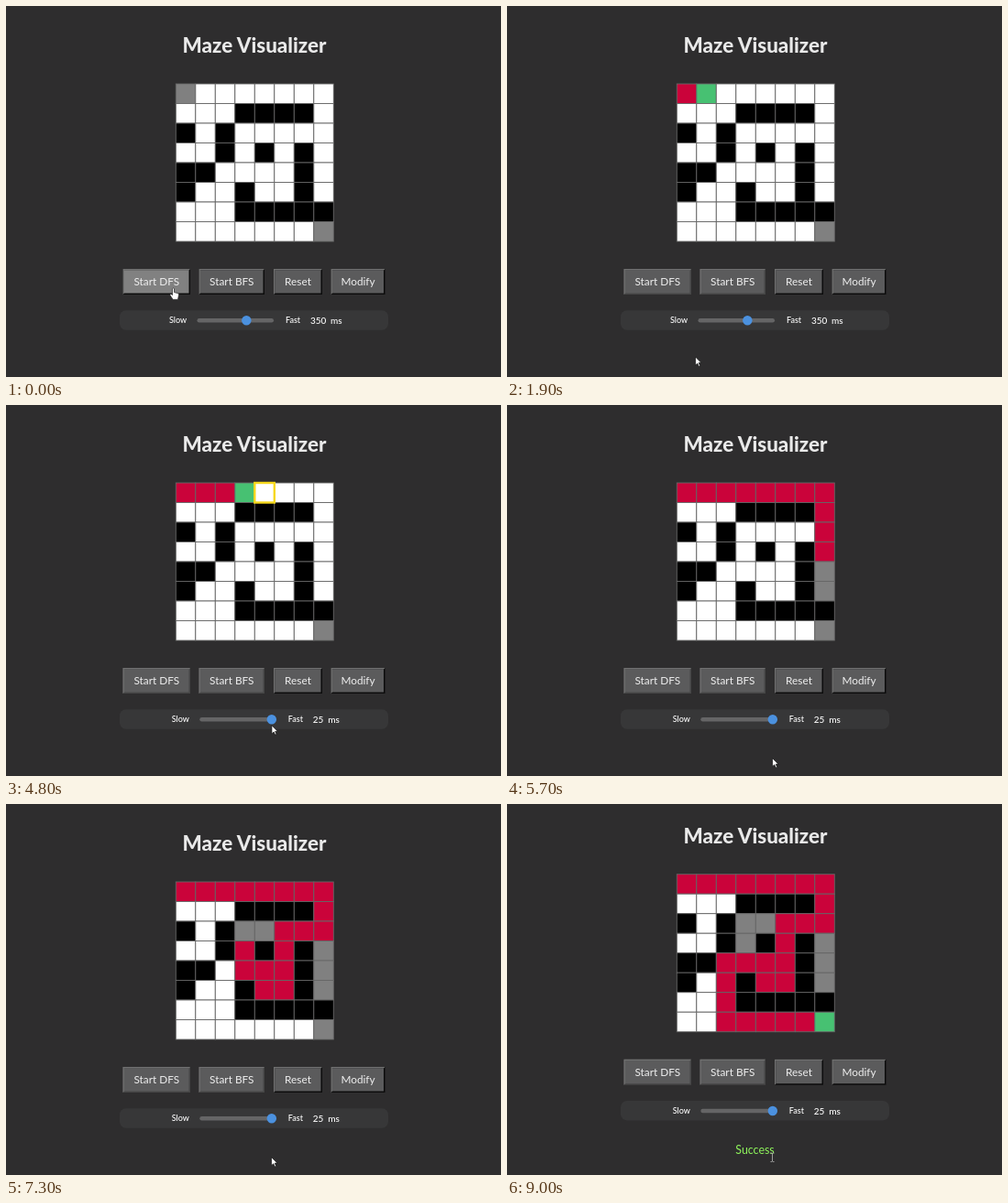
An HTML page for the animation above (9200 ms loop, 540x405 px).

```html
<!DOCTYPE html>
<html lang="en">
<head>
<meta charset="utf-8">
<title>Maze Visualizer</title>
<style>
  html, body { margin: 0; width: 100%; height: 100%; overflow: hidden; background: #2e2d2e; }
  svg { display: block; width: 540px; height: 405px; }
  text { font-family: Lato, "Open Sans", sans-serif; fill: #efefef; }
  .title { font-size: 22.4px; font-weight: 800; fill: #e9e9e9; }
  .button { font-size: 11.8px; }
  .label { font-size: 9px; font-weight: 500; fill: #fff; }
  .value { font-size: 10px; font-weight: 500; fill: #fff; }
  .mid { text-anchor: middle; }
</style>
</head>
<body>
<svg viewBox="0 0 540 405">
  <g id="page">
    <text class="title mid" x="271" y="51">Maze Visualizer</text>
    <g id="maze" stroke="#666" stroke-width=".9"></g>
    <rect id="probe" width="21.5" height="21.5" fill="none" stroke="#f6d81c" stroke-width="2.4"/>
    <g id="buttons"></g>
    <rect x="124" y="332.3" width="293" height="21.4" rx="7" fill="#373738"/>
    <g id="slider">
      <text class="label" x="178" y="346.4">Slow</text>
      <rect x="208.5" y="341" width="83.5" height="4.6" rx="2.3" fill="#656566"/>
      <circle id="thumb" cy="343.3" r="5.2" fill="#4b91df"/>
      <text class="label" x="305" y="346.4">Fast</text>
      <text id="value" class="value" x="332" y="347"></text>
    </g>
    <text id="unit" class="value" y="347">ms</text>
  </g>
  <text id="success" class="mid" x="270.5" y="382.4" style="font-size:12.4px;fill:#8ff65c">Success</text>
  <g id="cursor" stroke-linejoin="round">
    <path id="arrow" d="M0 0V9.2L2.2 7.2L3.7 10.4L5.2 9.7L3.7 6.6H6.5Z" fill="#fff" stroke="#111" stroke-width=".7"/>
    <path id="hand" d="M-1 0.6Q0 -.6 1 .6V4.6L5 5.6Q6.2 6 6 7.6L5 12.4H-.4L-3.6 7.6Q-3.4 6 -1.8 6.8L-1 7.6Z" fill="#fff" stroke="#222" stroke-width=".7"/>
    <path id="beam" d="M-2 -4.5H-.6L0 -4L.6 -4.5H2M0 -4V4.5M-2 5H-.6L0 4.5L.6 5H2" fill="none" stroke="#aaa" stroke-width=".9"/>
  </g>
</svg>
<script>
const LOOP = 9200, N = 8, CELL = 21.5, LEFT = 185.3, TOP = 85;
const CLICK = 620, FIRST = 977, SLOW = 358, FAST_FROM = 4783, FAST = 100 / 3, DONE = 8483;
const OPEN = '#fff', WALL = '#000', DEAD = '#808080', PATH = '#ca033a', HEAD = '#47c172';

const $ = id => document.getElementById(id);
const set = (el, attrs) => { for (const k in attrs) el.setAttribute(k, attrs[k]); return el; };
const add = (parent, tag, attrs) =>
  parent.appendChild(set(document.createElementNS('http://www.w3.org/2000/svg', tag), attrs));
const show = (el, on) => { el.style.display = on ? '' : 'none'; };
const cellX = i => LEFT + i % N * CELL, cellY = i => TOP + Math.floor(i / N) * CELL;

// Depth-first search, recorded one step at a time
const plan = ['........', '...####.', '#.#.....', '..#.#.#.', '##....#.', '#..#..#.', '...#####', '........'].join('');
const grid = [...plan].map(c => c === '#' ? WALL : OPEN);
grid[0] = grid[63] = DEAD;
const initial = { colors: [...grid], probe: -1 };
const steps = [], seen = new Set();
const record = (probe = -1) => steps.push({ colors: [...grid], probe });

function visit(i) {
  seen.add(i);
  grid[i] = HEAD;
  record();
  if (i === 63) return true;
  const r = Math.floor(i / N), c = i % N;
  for (const [dr, dc] of [[-1, 0], [0, 1], [1, 0], [0, -1]]) {
    const y = r + dr, x = c + dc, next = y * N + x;
    if (y < 0 || x < 0 || y >= N || x >= N) continue;
    record(next);
    if (grid[next] === WALL || seen.has(next)) continue;
    grid[i] = PATH;
    if (visit(next)) return true;
  }
  grid[i] = DEAD;
  record();
  return false;
}
visit(0);

const stepStart = i => i < 6 ? FIRST + i * SLOW : i === 6 ? 3775 : FAST_FROM + (i - 7) * FAST;
function stateAt(t) {
  let i = steps.length - 1;
  while (i >= 0 && stepStart(i) > t) i--;
  return i < 0 ? initial : steps[i];
}

const cells = grid.map((_, i) => add($('maze'), 'rect', { x: cellX(i), y: cellY(i), width: CELL, height: CELL }));

const buttons = [['Start DFS', 127.5, 73.5], ['Start BFS', 210.5, 71.5], ['Reset', 292, 53], ['Modify', 354.5, 59]]
  .map(([label, x, w]) => {
    const edge = add($('buttons'), 'rect', { x, y: 287, width: w, height: 28 });
    add($('buttons'), 'path', { d: `M${x} 315V287H${x + w}L${x + w - 1.5} 288.5H${x + 1.5}V313.5Z`, fill: '#707070' });
    const face = add($('buttons'), 'rect', { x: x + 1.3, y: 288.3, width: w - 2.8, height: 25.2 });
    add($('buttons'), 'text', { class: 'button mid', x: x + w / 2, y: 305.4 }).textContent = label;
    return { edge, face };
  });

// Keys are [time, value, value...]; values between keys are eased
function track(keys, t) {
  const k = keys.findIndex(key => key[0] > t);
  if (k < 0) return keys[keys.length - 1].slice(1);
  const a = keys[k - 1], b = keys[k], p = (t - a[0]) / (b[0] - a[0]), e = p * p * (3 - 2 * p);
  return a.slice(1).map((v, j) => v + (b[j + 1] - v) * e);
}
const pointer = [[0, 182.5, 308], [700, 182.5, 308], [1350, 205.5, 383], [1950, 205.5, 383], [2350, 262, 343.5],
  [2420, 262, 343.5], [2740, 211, 344], [3880, 211, 344], [4400, 290, 344], [4680, 290, 344], [5200, 289.5, 385.5]];
const delay = [[0, 350], [2420, 350], [2740, 1000], [3880, 1000], [4400, 25]];

function draw(t) {
  const { colors, probe } = stateAt(t);
  cells.forEach((cell, i) => set(cell, { fill: colors[i] }));
  show($('probe'), probe >= 0 && t < DONE);
  if (probe >= 0) set($('probe'), { x: cellX(probe), y: cellY(probe) });

  const done = t >= DONE;
  set($('page'), { transform: `translate(0 ${done ? -8.3 : 0})` });
  show($('success'), done);

  buttons.forEach(({ edge, face }, i) => {
    const disabled = i < 2 && t >= CLICK;
    set(edge, { fill: disabled ? '#464646' : '#0c0c0c' });
    set(face, { fill: i === 0 && !disabled ? '#818181' : '#5b5b5c' });
  });

  const ms = Math.round(track(delay, t)[0] / 25) * 25;
  const shift = 2.8 * (3 - String(ms).length);
  set($('slider'), { transform: `translate(${shift} 0)` });
  set($('thumb'), { cx: 213 + (1000 - ms) * 0.0759 });
  $('value').textContent = ms;
  set($('unit'), { x: 354 - shift });

  const [x, y] = track(pointer, t);
  const hand = y < 315 || (y > 338 && y < 349 && t > 1950);
  const beam = t >= 8650;
  set($('cursor'), { transform: `translate(${x} ${y})` });
  show($('hand'), hand);
  show($('beam'), beam);
  show($('arrow'), !hand && !beam);
}

const begin = performance.now();
function frame() {
  draw((performance.now() - begin) % LOOP);
  requestAnimationFrame(frame);
}
frame();
</script>
</body>
</html>
```
